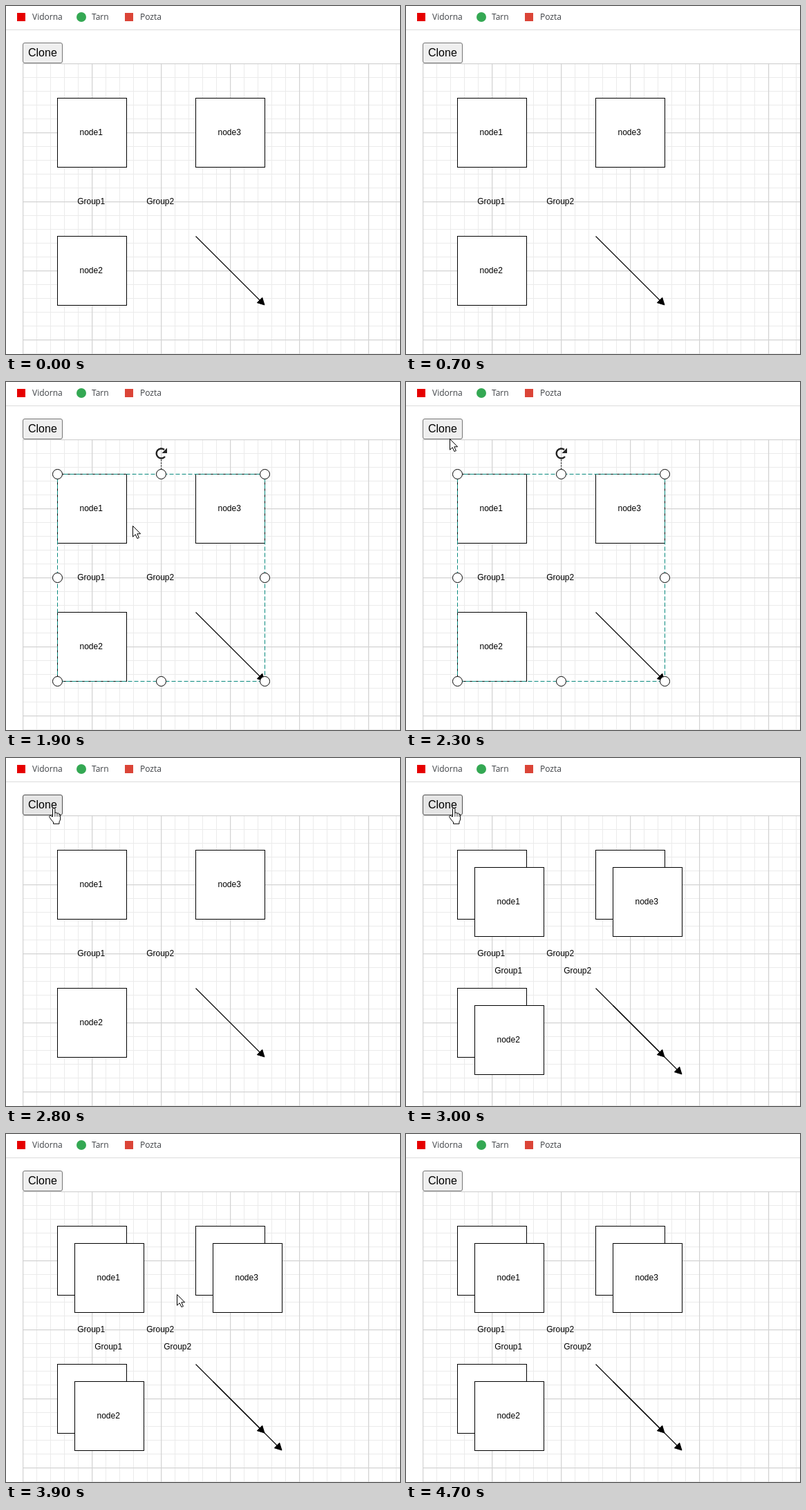
Animation, 570 px wide and 504 px high, one loop 4800 ms. Source, as an HTML page:

```html
<!DOCTYPE html>
<html lang="en">
<head>
<meta charset="utf-8">
<title>Clone diagram</title>
<style>
  html, body { margin: 0; width: 100%; height: 100%; overflow: hidden; background: #fff; }
  svg { display: block; }
  .bookmark { font: 12px "Open Sans", "Noto Sans", sans-serif; fill: #3f4246; }
  .label { font: 12px "Liberation Sans", Arial, sans-serif; text-anchor: middle; }
  .button rect { fill: #efefef; stroke: #767676; }
  .button.hover rect { fill: #e5e5e5; stroke: #4f4f4f; }
  .button text { font: 16px "Liberation Sans", Arial, sans-serif; }
  .node, .handle { fill: #fff; stroke: #000; }
  .pointer path { fill: #fff; stroke: #000; stroke-linejoin: round; }
</style>
</head>
<body>
<svg width="570" height="504" viewBox="0 0 570 504">
  <defs>
    <g id="diagram"></g>
  </defs>

  <rect x="16" y="10" width="12" height="12" fill="#e60000"/>
  <circle cx="109" cy="16" r="7" fill="#34a853"/>
  <rect x="172" y="10" width="12" height="12" fill="#db4437"/>
  <g class="bookmark">
    <text x="38" y="20">Vidorna</text>
    <text x="124" y="20">Tarn</text>
    <text x="194" y="20">Pozta</text>
  </g>
  <path d="M0 34.5H570" stroke="#dcdcdc"/>

  <g id="grid" fill="none"></g>

  <use href="#diagram"/>
  <use href="#diagram" id="copy" x="25" y="25"/>

  <g id="selection" transform="translate(.5 .5)">
    <rect x="74" y="133" width="300" height="300" fill="none" stroke="#0a8a7f" stroke-dasharray="6 3"/>
    <path d="M224 112V126" stroke="#000" stroke-dasharray="2 2"/>
    <path d="M229.5 107.5A7 7 0 1 1 228.5 97.5" fill="none" stroke="#222" stroke-width="2.4"/>
    <path d="M232.5 95V102.5H225Z" fill="#222"/>
  </g>

  <g id="button" class="button">
    <rect x="24.5" y="53.5" width="57" height="29" rx="2.5"/>
    <text x="32" y="73">Clone</text>
  </g>

  <g id="arrow" class="pointer">
    <path d="M.5 .5V16.2L4.2 12.8 6.9 18.6 9.4 17.5 6.8 11.8H11.6Z"/>
  </g>
  <g id="hand" class="pointer">
    <path d="M-2.5 12V1.2Q-2.3 -.5 -.8 -.5T.9 1.2V7Q1.2 5.9 2.5 6T4 7.6Q4.4 6.7 5.5 6.9T6.9 8.5Q8.5 7.9 8.7 10V15Q8.5 17.5 7 19.5V22.3H-1.5V20Q-4.5 17 -6.8 13.2C-8.3 10.5 -5.8 9.6 -4.4 11.2Z"/>
    <path d="M.9 7V12M4 7.6V12M6.9 8.5V12" stroke-width=".8"/>
  </g>
</svg>

<script>
const SVG = "http://www.w3.org/2000/svg";
const $ = id => document.getElementById(id);

function add(parent, tag, attrs, text) {
  const el = document.createElementNS(SVG, tag);
  for (const key in attrs) el.setAttribute(key, attrs[key]);
  if (text) el.textContent = text;
  parent.append(el);
  return el;
}

// Grid: a strong line after every five cells
function gridLines(step, skip, stroke, width) {
  let d = "";
  for (let i = 0; i * step < 560; i++) {
    if (skip && i % 5 === 0) continue;
    const x = 24 + i * step + width / 2, y = 83 + i * step + width / 2;
    d += `M${x} 83V504M24 ${y}H570`;
  }
  add($("grid"), "path", { d, stroke, "stroke-width": width });
}
gridLines(20, true, "#ebebeb", 1);
gridLines(100, false, "#d3d3d3", 1.25);

// Diagram parts
const diagram = $("diagram");
const label = (text, x, y) =>
  add(diagram, "text", { class: "label", x: x - 0.8, y: y + 4 }, text);

function node(text, x, y) {
  add(diagram, "rect", { class: "node", x: x + 0.5, y: y + 0.5, width: 100, height: 100 });
  label(text, x + 50, y + 50);
}
node("node1", 74, 133);
node("node2", 74, 333);
node("node3", 274, 133);
label("Group1", 124, 283);
label("Group2", 224, 283);
add(diagram, "path", { d: "M274.5 333.5L368 427", stroke: "#000", "stroke-width": 1.1 });
add(diagram, "path", { d: "M374 433L363.3 429.7 370.7 422.3Z", stroke: "#000" });

// Resize handles around the selection
for (const x of [74, 224, 374])
  for (const y of [133, 283, 433])
    if (x !== 224 || y !== 283) add($("selection"), "circle", { class: "handle", cx: x, cy: y, r: 7 });

// Pointer path: time, x, y
const LOOP = 4800, TICK = 100;
const path = [
  [1400, 197, 223], [1800, 197, 223], [2300, 63, 82], [2400, 70, 73],
  [3700, 70, 73], [4100, 423, 391]
];
const SHOWN = [1400, 4200], SELECTED = [1700, 2700], HOVER = [2400, 3800], COPIED = [2900, LOOP];

const within = (t, [from, to]) => t >= from && t < to;
const show = (id, on) => $(id).setAttribute("visibility", on ? "visible" : "hidden");

function pointerAt(t) {
  const i = path.findIndex(p => p[0] > t);
  if (i < 0) return path.at(-1).slice(1);
  if (i === 0) return path[0].slice(1);
  const [t0, x0, y0] = path[i - 1], [t1, x1, y1] = path[i];
  const k = (t - t0) / (t1 - t0), ease = k * k * (3 - 2 * k);
  return [Math.round(x0 + (x1 - x0) * ease), Math.round(y0 + (y1 - y0) * ease)];
}

const start = performance.now();

function draw(now) {
  const elapsed = Math.max(0, now - start) % LOOP;
  const t = Math.floor(elapsed / TICK) * TICK;
  const hover = within(t, HOVER), shown = within(t, SHOWN);
  const place = `translate(${pointerAt(t).join(" ")})`;

  show("selection", within(t, SELECTED));
  show("copy", within(t, COPIED));
  show("arrow", shown && !hover);
  show("hand", shown && hover);
  $("arrow").setAttribute("transform", place);
  $("hand").setAttribute("transform", place);
  $("button").classList.toggle("hover", hover);
  requestAnimationFrame(draw);
}
draw(start);
</script>
</body>
</html>
```
